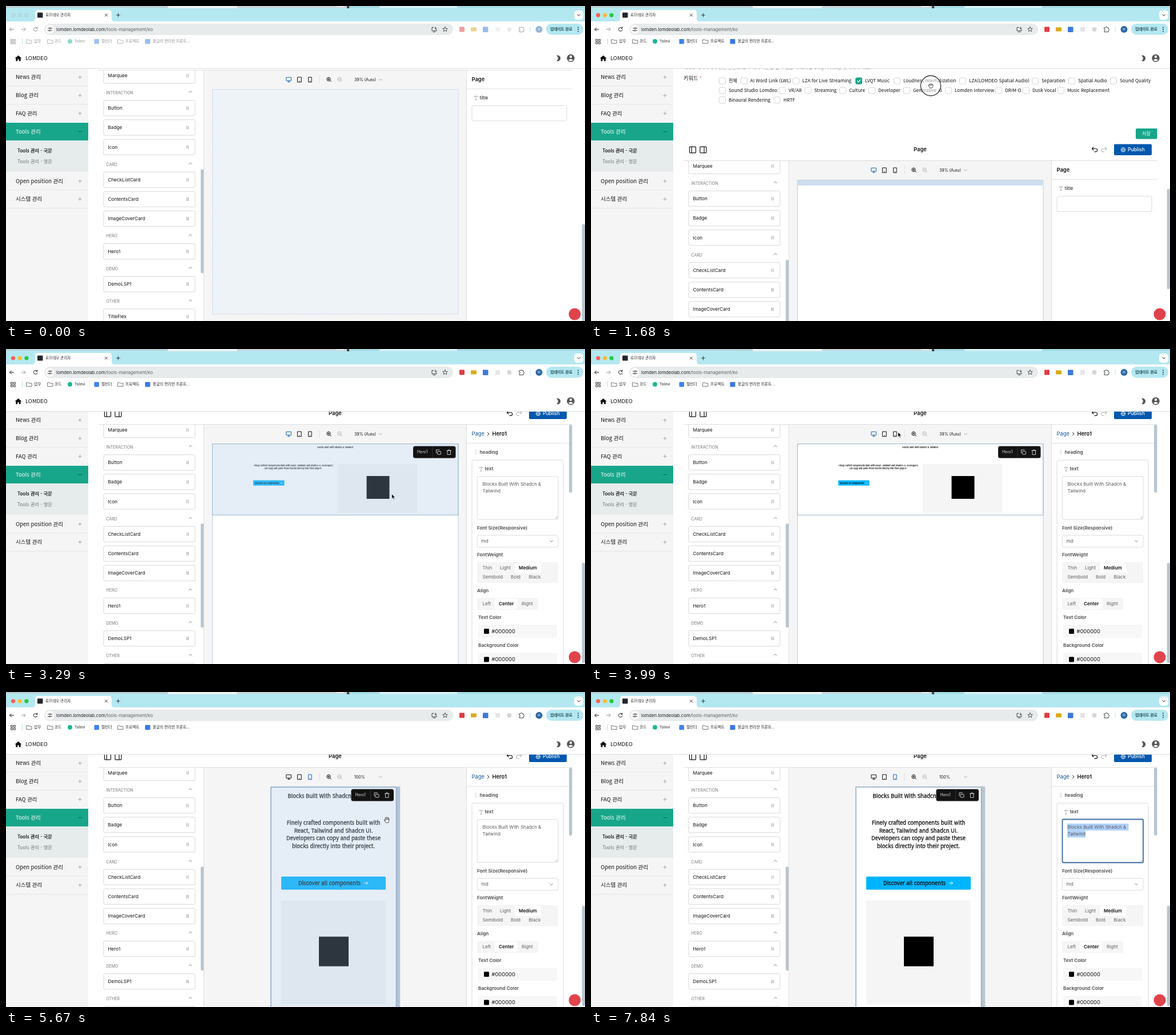
Animation of 1014x553 px, one loop 8 s. Source, as an HTML page:

```html
<!DOCTYPE html>
<html lang="ko">
<head>
<meta charset="utf-8">
<title>Page editor</title>
<style>
html, body { margin: 0; width: 100%; height: 100%; overflow: hidden; background: #fff; }
svg { display: block; width: 100%; height: 100%; }
text { font-family: Inter, "Noto Sans CJK KR", "Noto Sans CJK", sans-serif; white-space: pre; }
.k { font-family: "Noto Sans CJK KR", "Noto Sans CJK", "Noto Sans", sans-serif; }
</style>
</head>
<body>
<svg id="stage" viewBox="0 0 1014 553"></svg>
<script>
const LOOP = 8000;
const GREEN = '#18a68b', GREY = '#767676', INK = '#111', BLUE = '#1766b1';

// Drawing helpers; text is placed by its vertical centre.
const text = (x, y, s, size = 8.2, fill = INK, o = {}) =>
  `<text x="${x}" y="${y + size * .36}" font-size="${size}" fill="${fill}" font-weight="${o.w || 400}"` +
  ` text-anchor="${o.a || 'start'}" class="${o.k ? 'k' : ''}" ${o.x || ''}>${s}</text>`;
// The Korean face has no medium cut, so a thin outline thickens it.
const ko = (x, y, s, size = 8.29, fill = INK, bold = false, a = 'start') =>
  text(x, y, s, size, fill, { a, k: 1, x: bold ? `stroke="${fill}" stroke-width="${size * .03}"` : '' });
const mid = (x, y, s, size, fill = INK, bold = true) => ko(x, y, s, size, fill, bold, 'middle');
const rect = (x, y, x2, y2, fill, r = 0, stroke = 'none', extra = '') =>
  `<rect x="${x}" y="${y}" width="${x2 - x}" height="${y2 - y}" rx="${r}" fill="${fill}" stroke="${stroke}" ${extra}/>`;
const dot = (x, y, r, fill, stroke = 'none', w = 1) =>
  `<circle cx="${x}" cy="${y}" r="${r}" fill="${fill}" stroke="${stroke}" stroke-width="${w}"/>`;
const line = (d, c = INK, w = 1, fill = 'none') =>
  `<path d="${d}" stroke="${c}" stroke-width="${w}" fill="${fill}" stroke-linecap="round" stroke-linejoin="round"/>`;
const rule = (x, y, x2, y2, c = '#ddd', w = 1) => `<path d="M${x} ${y}L${x2} ${y2}" stroke="${c}" stroke-width="${w}"/>`;
const group = (id, s) => `<g id="${id}">${s}</g>`;
const plus = (x, y, r, c, w = .8) => line(`M${x - r} ${y}h${2 * r}M${x} ${y - r}v${2 * r}`, c, w);
const chevron = (x, y, s, c = '#666', w = .8) => line(`M${x - 2.5} ${y - s}l2.5 ${2 * s}l2.5 ${-2 * s}`, c, w);

function browser() {
  const folder = x => line(`M${x} 59h3l1 1.2h5v5.3h-9z`, '#555', .8);
  const marks = [[49, '업무'], [85, '코드'], [120, 'Tolevi'], [167, '캘린더'], [209, '프로젝트'], [257, '몽글의 편리한 프론트...']];
  const apps = [8.5, 13.3].map(x => [58.5, 63.3].map(y => rect(x, y, x + 3, y + 3, 'none', 0, '#333', 'stroke-width=".9"')).join('')).join('');
  const lights = ['#fe5f57', '#febc2e', '#28c840'].map((c, i) => dot(12.5 + i * 11.7, 16, 3.6, c)).join('');
  const calm = [0, 1, 2].map(i => dot(12.5 + i * 11.7, 16, 3.3, '#b9dce3', '#a5cbd3', .7)).join('');
  const dimmable =
    line('M13.5 41h-7M9.5 38l-3 3l3 3') +
    line('M54.2 38.7a3.3 3.3 0 1 0 .7 3.2M54.8 37v2.2h-2.2') + apps +
    folder(36) + folder(73) + folder(196) +
    dot(112, 62, 4, '#19b894') + rect(154.5, 58, 163, 66.5, '#3f82ee', 1) + rect(243.5, 58, 252.5, 66.5, '#3978e6', 1) +
    marks.map(([x, s]) => ko(x, 62, s, 6.7, '#222')).join('') +
    rect(794, 36.5, 803, 45.5, '#dc3f45', 1) + rect(814, 37.5, 824, 44.5, '#d9ab1d', 1) +
    rect(835, 36.5, 844.5, 46, '#3d7ad4', 1) + rect(857, 37, 865, 45, '#e3e5e6', 1) + dot(881.5, 41, 4, '#d4d7d9') +
    line('M899 38h2.3a1.4 1.4 0 0 1 2.8 0h2v2.2a1.4 1.4 0 0 1 0 2.8v2.5h-7.1v-2.3a1.4 1.4 0 0 0 0-2.8z', '#333', .9) +
    dot(933.5, 41, 6, '#2c69a6') + text(933.5, 41, 'H', 6, '#fff', { a: 'middle' });
  return rect(0, 0, 1014, 74, '#b4e8f1') + rect(0, 0, 600, 3, '#b9cfd4') + rect(283, 0, 405, 4, '#edf1f2', 2) +
    rect(405, 0, 597, 3, '#ccd3d6') + rect(579, 0, 592, 2, '#eee') + rect(597, 0, 601.5, 4, '#463f44') +
    rect(601, 0, 1014, 3, '#a4d9e4') + rect(654, 0, 790, 3.5, '#d8f3f7', 1) +
    group('calm', calm) + group('lights', lights) +
    line('M46 27q5 0 5-5v-10q0-5 5-5h124q5 0 5 5v10q0 5 5 5z', 'none', 0, '#fff') +
    rect(55, 11.5, 64.5, 20.5, '#20262d', 1) + ko(69, 16, '로므데오 관리자', 6.6, '#222') +
    line('M173.4 13.9l4.2 4.2m0-4.2l-4.2 4.2', '#222', .9) + plus(196.5, 16, 3, '#222', .9) +
    rect(995, 8, 1011, 24, '#fff', 5) + chevron(1003, 16, 1.2, '#222', 1) +
    rect(0, 27, 1014, 74, '#fff') + rect(67, 31, 783, 51, '#e7ebec', 10) + dot(77, 41, 7.5, '#fff') +
    line('M73.5 39h2.5M79 39h2M73 43h2M78 43h3', '#333', .9) + dot(77.5, 39, 1.2, 'none', '#333', .9) + dot(76.5, 43, 1.2, 'none', '#333', .9) +
    text(88, 41, 'lomden.lomdeolab.com<tspan fill="#5c6264">/tools-management/ko</tspan>', 7.75, '#1e2224') +
    line('M749 37.5h-3v6h8v-2M748 45.5h4M752.5 37v3.5m-1.7-1.5l1.7 1.7l1.7-1.7', '#333', .9) +
    line('M769 36.7l1.2 2.8l3 .2l-2.3 2l.8 2.9l-2.7-1.6l-2.7 1.6l.8-2.9l-2.3-2l3-.2z', '#333', .8) +
    line('M27 41h7M31 38l3 3l-3 3', '#999') + rule(28.5, 57, 28.5, 67, '#b6dfe6') + rule(918, 36, 918, 46, '#b4e8f1') +
    group('tools', dimmable) + rect(946, 31, 1011, 50.5, '#b4e8f1', 9.5) +
    ko(953, 41, '업데이트 완료', 6.7, '#143f49', true) + [37.5, 41, 44.5].map(y => dot(1002, y, .9, '#123')).join('');
}

function shell() {
  const items = [[125, 'News 관리'], [157, 'Blog 관리'], [188.5, 'FAQ 관리'], [307.5, 'Open position 관리'], [339, '시스템 관리']];
  return rect(0, 74, 1014, 110, '#fff') + rule(0, 73.5, 1014, 73.5, '#d9dcdd') + rule(0, 109.5, 1014, 109.5, '#dcdcdc') +
    line('M15.5 92l6-5.3l6 5.3h-1.8v4.7h-3v-3.2h-2.4v3.2h-3v-4.7z', 'none', 0, '#111') + ko(34, 92, 'LOMDEO', 9.48) +
    line('M964 87a5.2 5.2 0 1 1 0 9.6a5.6 5.6 0 0 0 0-9.6z', 'none', 0, '#555') +
    dot(989, 91.5, 6.7, '#555') + dot(989, 89, 2.2, '#fff') + line('M984.8 95q4.2-4 8.4 0q-4.2 3.6-8.4 0z', 'none', 0, '#fff') +
    rect(0, 110, 144, 553, '#f5f5f5') + [140.5, 172.5, 323, 355].map(y => rule(0, y, 144, y, '#e6e6e6')).join('') +
    items.map(([y, s]) => ko(17, y, s, 9.48) + plus(129.5, y, 2.7, '#999')).join('') +
    rect(0, 205, 144, 236, GREEN) + ko(17, 220.5, 'Tools 관리', 9.48, '#fff') + line('M127 220.5h5.5', '#063', 1) +
    rect(0, 236, 144, 291, '#e6ebeb') + ko(20, 254, 'Tools 관리 - 국문', 8.29, INK, true) + ko(20, 273.5, 'Tools 관리 - 영문', 8.29, GREY);
}

function keywords() {
  const rows = [
    [[230, '전체'], [268, 'AI Word Link (LWL)'], [359, 'LZA for Live Streaming'], [469, 'LVQT Music'], [536, 'Loudness Normalization'],
     [651, 'LZA(LOMDEO Spatial Audio)'], [778, 'Separation'], [842, 'Spatial Audio'], [915, 'Sound Quality']],
    [[230, 'Sound Studio Lomdeo'], [335, 'VR/AR'], [380, 'Streaming'], [441, 'Culture'], [492, 'Developer'], [553, 'Generative AI'],
     [626, 'Lomden Interview'], [714, 'DRIM-O'], [762, 'Dusk Vocal'], [823, 'Music Replacement']],
    [[230, 'Binaural Rendering'], [326, 'HRTF']]];
  const box = (x, y, on) => rect(x - 5.5, y - 5.5, x + 5.5, y + 5.5, on ? GREEN : '#fff', 2, on ? GREEN : '#d0d0d0', 'stroke-width=".9"') +
    (on ? line(`M${x - 2.5} ${y}l2 2l3.2-3.8`, '#fff', 1.2) : '');
  return ko(162, -163.5, 'Tools 페이지에서 관련 콘텐츠 보러 가기 버튼을 클릭 했을 때 보여줄 Blog 키워드를 선택해 주세요.', 8, '#999') +
    ko(162, -145, '키워드 <tspan fill="#e0706c">*</tspan>', 9.2) +
    rows.map((r, i) => r.map(([x, s]) => box(x, -140.5 + i * 16.8, x === 469) + ko(x + 11, -140.5 + i * 16.8, s, 8.15)).join('')).join('') +
    rect(954, -57, 991.5, -38.5, GREEN, 2) + mid(972.5, -47.5, '저장', 8.2, '#fff', false);
}

function toolbar() {
  const side = (x, bar) => rect(x, -24.8, x + 11, -14.2, 'none', 1, INK, 'stroke-width="1.2"') + rule(x + bar, -25, x + bar, -14, INK, 1.2);
  const turn = (x, k, c) => line(`M${x - 4.5 * k} -21.5h${6.5 * k}a2.7 2.7 0 0 ${k > 0 ? 1 : 0} 0 5.4h${-2 * k}` +
    `M${x - 2 * k} -24l${-2.5 * k} 2.5l${2.5 * k} 2.5`, c, 1.1);
  return side(172.5, 3.8) + side(191, 7.2) + text(576.5, -20, 'Page', 9.4, INK, { w: 600, a: 'middle' }) +
    turn(882, 1, INK) + turn(898.5, -1, '#bbb') + rect(916, -29.5, 982, -10, '#0158ad', 2) +
    dot(932, -19.5, 3.7, 'none', '#fff', .8) + line('M928.4 -19.5h7.2M932 -23q-3.4 3.5 0 7q3.4-3.5 0-7', '#fff', .7) +
    text(940, -20, 'Publish', 8.5, '#fff', { w: 500 });
}

const grip = (x, y) => [0, 1, 2].map(i => dot(x - 1.2, y - 2 + i * 2, .6, '#444') + dot(x + 1.2, y - 2 + i * 2, .6, '#444')).join('');
const card = (y, s) => rect(171, y - 13.6, 331, y + 13.6, '#fff', 2, '#d4d4d4', 'stroke-width=".9"') + text(178.5, y, s) + grip(318, y);

function drawer() {
  const cards = [[9, 'Marquee'], [66.3, 'Button'], [100.3, 'Badge'], [134.6, 'Icon'], [192, 'CheckListCard'], [226.2, 'ContentsCard'],
    [260.4, 'ImageCoverCard'], [317.8, 'Hero1'], [375.2, 'DemoLSP1'], [432.5, 'TitleFlex']];
  const heads = [[39, 'INTERACTION'], [165, 'CARD'], [290.6, 'HERO'], [348, 'DEMO'], [405.4, 'OTHER']];
  return `<g clip-path="url(#list)">` + cards.map(c => card(...c)).join('') + '</g>' +
    heads.map(([y, s]) => text(175.5, y, s, 7, GREY) + chevron(323, y - 1.5, -1.1)).join('') +
    rect(341, 173.5, 346.5, 356, '#b9c6cf', 2.5);
}

function controls() {
  const loupe = (x, c, s) => dot(x - .5, 15.5, 3.2, 'none', c, 1) + line(`M${x + 2} 18l2 2M${x - 2} 15.5h3` + s, c, 1);
  return group('monitor', line('M491.2 12.3h8.2v5.8h-8.2zM495.3 18v2M493.3 20.3h4', 'currentColor')) +
    line('M510.8 12h6.4v8.6h-6.4zM513.7 18.8h.6') +
    group('handset', line('M530 12h5.2v8.6h-5.2zM532.3 18.8h.6', 'currentColor')) +
    rule(549, 9.5, 549, 22.5) + loupe(565.5, INK, 'M564.9 14v3') + loupe(584.5, '#b5b5b5', '') +
    group('zoomAuto', text(610, 16, '39% (Auto)', 7)) + group('zoomFull', text(610, 16, '100%', 7)) + chevron(656, 16.3, 1, '#aaa', 1);
}

function actions(x) {
  return rect(x, 37.5, x + 74.5, 58.5, '#131313', 3.5) + text(x + 7, 48, 'Hero1', 6.9, '#ddd') + rule(x + 34, 38, x + 34, 58, '#333') +
    rect(x + 42.5, 46.5, x + 48.5, 52, 'none', 1, '#ddd', 'stroke-width=".9"') + line(`M${x + 40.5} 49.5v-5.6h5.6`, '#ddd', .9) +
    line(`M${x + 59} 45.3h7.5M${x + 61.5} 45.3v-1.3h2.5v1.3M${x + 60} 45.3v7h5.5v-7`, '#ddd', .9);
}

const TITLE = 'Blocks Built With Shadcn &amp; Tailwind';

function canvas() {
  const paper = (fill, extra) => rect(361.5, 33.5, 792, 428, fill, 0, '#aec5dc', 'stroke-width=".8" ' + extra);
  const z = .39 * 9.48;
  const desk = mid(576.5, 39.3, TITLE, z) +
    mid(503, 71.5, 'Finely crafted components built with React, Tailwind and Shadcn UI. Developers', z) +
    mid(503, 77, 'can copy and paste these blocks directly into their project.', z) +
    rect(433, 97.5, 487.5, 106.7, '#00b7ff', .6) + mid(457, 102.2, 'Discover all components', z) + line('M481 102.2h2.6m-1-1l1 1l-1 1', '#fff', .4) +
    rect(580.5, 69, 720, 154.5, '#f5f5f5') + rect(631.5, 90, 671.5, 130, '#000') +
    group('deskTint', rect(361, 33, 792, 158.5, 'rgba(160,190,226,.28)')) +
    rect(361.5, 33.5, 792, 158.5, 'none', 0, '#92b1c6', 'stroke-width=".9"') + actions(713);
  const lines = ['Finely crafted components built with', 'React, Tailwind and Shadcn UI.', 'Developers can copy and paste these', 'blocks directly into their project.'];
  const phone = rect(463.5, 33, 690, 440, '#fff', 0, '#ccd3d8', 'stroke-width=".8"') + mid(573.5, 50, TITLE, 9.48) +
    lines.map((s, i) => mid(573.5, 96.2 + i * 13.9, s, 9.48)).join('') +
    rect(482, 191, 665, 214, '#00b5ff', 1.5) + mid(566.5, 202.8, 'Discover all components', 9.48) +
    line('M627.5 202.5h6m-2.6-2.6l2.6 2.6l-2.6 2.6', '#fff', .9) + rect(482, 233, 665, 415, '#f5f5f5', 2) +
    rect(548, 296.5, 600, 348.5, '#000') + rect(684, 33, 690, 440, '#b9c6cf', 2) +
    group('phoneTint', rect(463, 33, 690, 440, 'rgba(160,190,226,.28)')) +
    group('phoneSel', rect(464, 34, 683.5, 445, 'none', 0, '#8dabc8', 'stroke-width="1.4"') + actions(604.5));
  return group('empty', paper('#eef3f8', 'stroke-dasharray="2 1.3"')) +
    group('paper', paper('#fff', '')) + group('slot', rect(361.5, 33.5, 791.5, 43, '#cddeed')) +
    group('fresh', rect(361.5, 33.5, 791.5, 44.5, '#fff', 0, '#ddd', 'stroke-width=".6"') + text(363.5, 38.3, 'Hero1', 3.1) + dot(787, 37.6, .4, '#444') + dot(787, 39, .4, '#444')) +
    group('desk', desk) + group('phone', phone);
}

function panel() {
  const label = (x, y, s) => text(x, y, s, 8.2, '#4a4a4a', { w: 600 });
  const tee = (x, y) => line(`M${x - 3} ${y - 2}v-1.2h6v1.2M${x} ${y - 3}v6.3M${x - 1.2} ${y + 3.3}h2.4`, '#999', .8);
  const field = (x, y, x2, y2) => rect(x, y, x2, y2, '#fff', 2.5, '#d6d6d6', 'stroke-width=".9"');
  const opts = (y, list) => list.map(([x, s]) => text(x, y, s, 8.1, '#606060')).join('');
  const pick = (x, x2, y, tx, s) => rect(x, y - 9, x2, y + 8.5, '#fff', 2.5) + text(tx, y, s, 8.1, INK, { w: 600 });
  const color = y => rect(827, y - 11.5, 965, y + 11.5, '#f7f7f7', 2) + rect(837, y - 4.6, 846, y + 4.4, '#000', 1.5) + text(850.5, y, '#000000', 9.4);
  const head = s => text(815.5, 16, s, 9.4, INK, { w: 600 });
  const page = head('Page') + tee(823, 48.5) + label(829.5, 48.5, 'title') + field(816, 61.8, 982, 88.8);
  const hero = [45, 48, 51].map(y => dot(823, y, .7, '#888')).join('') + label(829.5, 48.5, 'heading') +
    field(816, 62, 976, 460) + tee(832, 78) + label(838.5, 77.5, 'text') + field(825.2, 90.8, 967, 166.2) +
    group('focus', rect(825.5, 90.5, 967, 166.5, 'none', 2, '#3d6ea3', 'stroke-width="1.8"')) +
    group('pickWord', rect(834, 110, 866, 122.5, '#b0d2f9')) + group('pickAll', rect(834, 98, 941.5, 110.2, '#b0d2f9')) +
    text(834.5, 104.2, 'Blocks Built With Shadcn &amp;', 8.1, '#5a5a5a') + text(834.5, 116.5, 'Tailwind', 8.1, '#5a5a5a') +
    line('M962 164.5l3.5-3.5M964 164.7l1.6-1.6', '#888', .6) +
    label(825, 181, 'Font Size(Responsive)') + field(825.2, 194, 967, 215) + text(832.5, 204.5, 'md', 8.2, '#555') + chevron(955, 204.5, 1.2) +
    label(825, 228, 'FontWeight') + rect(825, 241, 967, 278, '#f5f5f5', 3) + opts(251.5, [[834.5, 'Thin'], [865, 'Light']]) +
    pick(891.5, 937.5, 251.5, 898, 'Medium') + opts(267.5, [[834.5, 'Semibold'], [884, 'Bold'], [915.5, 'Black']]) +
    label(825, 291.3, 'Align') + rect(825, 304, 932, 325, '#f5f5f5', 3) + opts(314.5, [[834.5, 'Left'], [903, 'Right']]) +
    pick(856, 896, 314.5, 863, 'Center') + label(827, 338, 'Text Color') + color(362.5) + label(827, 387.2, 'Background Color') + color(412) +
    rect(986, 0, 991.5, 119, '#b9c6cf', 2.5);
  const trail = text(815.5, 16, 'Page', 9.4, '#165a9c') + line('M843.5 13.5l2.3 2.5l-2.3 2.5', INK, 1) + text(851.5, 16, 'Hero1', 9.4, INK, { w: 600 });
  return rect(806.5, 0, 991, 600, '#fff') + rule(806.5, 0, 806.5, 600) + rule(807, 32.5, 992, 32.5, '#e2e2e2') +
    group('pagePanel', page) + group('heroPanel', hero) + group('heroHead', head('Hero1')) + group('heroTrail', trail);
}

function pointer() {
  return group('ghost', `<g transform="translate(-250 -317.8)">${card(317.8, 'Hero1')}</g>`) +
    group('ring', dot(0, 0, 17.6, 'rgba(255,255,255,.55)', '#111', 1.1)) +
    group('arrow', line('M0 0v8.6l2-1.8l1.4 3l1.5-.7l-1.4-2.9h2.7z', '#fff', .7, '#111')) +
    group('fist', line('M-3.5 0q-.4-3 2-3q1.4-1 2.6 0q2.6-.4 2.8 1.8q.6 2.7-1.3 5h-4q-2-1.5-2.1-3.8zM-1.5-2v1.5M.3-2.2v1.7M2-1.8v1.4', '#222', .8, '#fff')) +
    group('hand', line('M-4.3 .5q1-1.2 2 .3l-.9-4q.9-1.5 1.7 0l.3-1.2q1-1 1.7 .3q1.3-1 1.7 .7q1.3-.6 1.5 1q.4 4-1.2 7.3h-4.3q-1.5-2.3-2.5-4.4zM-1.2-2.7l.4 2.5M.7-3v2.6M2.3-2.6v2.3', '#222', .8, '#fff')) +
    group('beam', line('M-1.5 -4.5h3M0 -4.5v9M-1.5 4.5h3', '#333', .7));
}

const stage = document.getElementById('stage');
stage.innerHTML =
  '<defs><clipPath id="main"><path d="M144 110H1014V553H144z"/></clipPath><clipPath id="list"><path d="M162 0H346V600H162z"/></clipPath></defs>' +
  rect(0, 0, 1014, 553, '#fff') +
  '<g clip-path="url(#main)">' + group('page', keywords() + toolbar() + drawer() + rect(347, 0, 806.5, 600, '#f5f5f5') + rule(346.5, 0, 346.5, 600) +
    controls() + canvas() + panel() + rule(162, -.5, 992, -.5)) + group('bar', rect(1008.7, 0, 1014, 176, '#b9c6cf', 2.5)) + '</g>' +
  shell() + browser() + dot(996, 541, 10.5, '#e0434b') + group('cursor', pointer());

const el = {};
stage.querySelectorAll('g[id]').forEach(g => el[g.id] = g);
const show = (id, on) => el[id].setAttribute('display', on ? 'inline' : 'none');
const move = (id, x, y) => el[id].setAttribute('transform', `translate(${x} ${y})`);

// Pointer path as [time, x, y].
const path = [[70, 245, 440], [200, 250, 431], [740, 595, 195], [910, 595, 190], [1240, 595, 140], [1750, 595, 140], [2520, 675.5, 254.5],
  [3290, 675.5, 254.5], [3920, 537.5, 146], [4200, 537.5, 146], [4700, 560.5, 189], [4830, 560.5, 189], [4900, 655, 244], [5250, 594, 227],
  [5530, 594, 227], [5670, 667, 224.5], [6250, 870, 250], [6440, 870, 249], [6650, 856, 251]];
const clamp = u => Math.max(0, Math.min(1, u));
const smooth = u => u * u * (3 - 2 * u);
function along(t) {
  let i = 0;
  while (i < path.length - 2 && t > path[i + 1][0]) i++;
  const [a, b] = [path[i], path[i + 1]];
  const u = smooth(clamp((t - a[0]) / (b[0] - a[0])));
  return [a[1] + (b[1] - a[1]) * u, a[2] + (b[2] - a[2]) * u];
}

function draw(t) {
  const within = (a, b) => t >= a && t < b;
  const top = 113 + 159 * clamp((t - 1260) / 420) - 139 * (1 - (1 - clamp((t - 2690) / 250)) ** 2);
  move('page', 0, top);
  move('bar', 0, 383 - (top - 113) * .39);

  const active = t >= 70, mobile = t >= 4270;
  show('lights', active);
  show('calm', !active);
  el.tools.setAttribute('opacity', active ? 1 : .5);

  const [x, y] = along(t);
  show('empty', t < 420);
  show('paper', within(420, 4270));
  show('slot', within(420, 2660));
  show('fresh', within(2660, 2730));
  show('desk', within(2730, 4270));
  show('deskTint', y > 166);
  show('phone', mobile);
  show('phoneSel', t >= 5600);
  show('phoneTint', t >= 5600 && x < 690);
  show('zoomAuto', !mobile);
  show('zoomFull', mobile);
  el.monitor.setAttribute('color', mobile ? INK : BLUE);
  el.handset.setAttribute('color', mobile ? BLUE : INK);

  const hero = within(2660, 4270) || t >= 5600;
  show('pagePanel', !hero);
  show('heroPanel', hero);
  show('heroHead', within(2660, 2800));
  show('heroTrail', hero && t >= 2800);
  show('focus', t >= 6300);
  show('pickWord', t >= 6650);
  show('pickAll', t >= 7070);

  const held = within(130, 2660);
  const kind = held ? 'fist' : t < 4270 ? 'arrow' : x > 825 ? 'beam' : x > 463 && x < 690 && y > 166 ? 'hand' : 'arrow';
  for (const k of ['fist', 'arrow', 'beam', 'hand']) show(k, k === kind);
  show('ring', held || within(5250, 5390));
  show('ghost', within(130, 420));
  show('cursor', active && t < 7840);
  move('cursor', x, y);
}

const start = performance.now();
(function tick() {
  draw((performance.now() - start) % LOOP);
  requestAnimationFrame(tick);
})();
</script>
</body>
</html>
```
